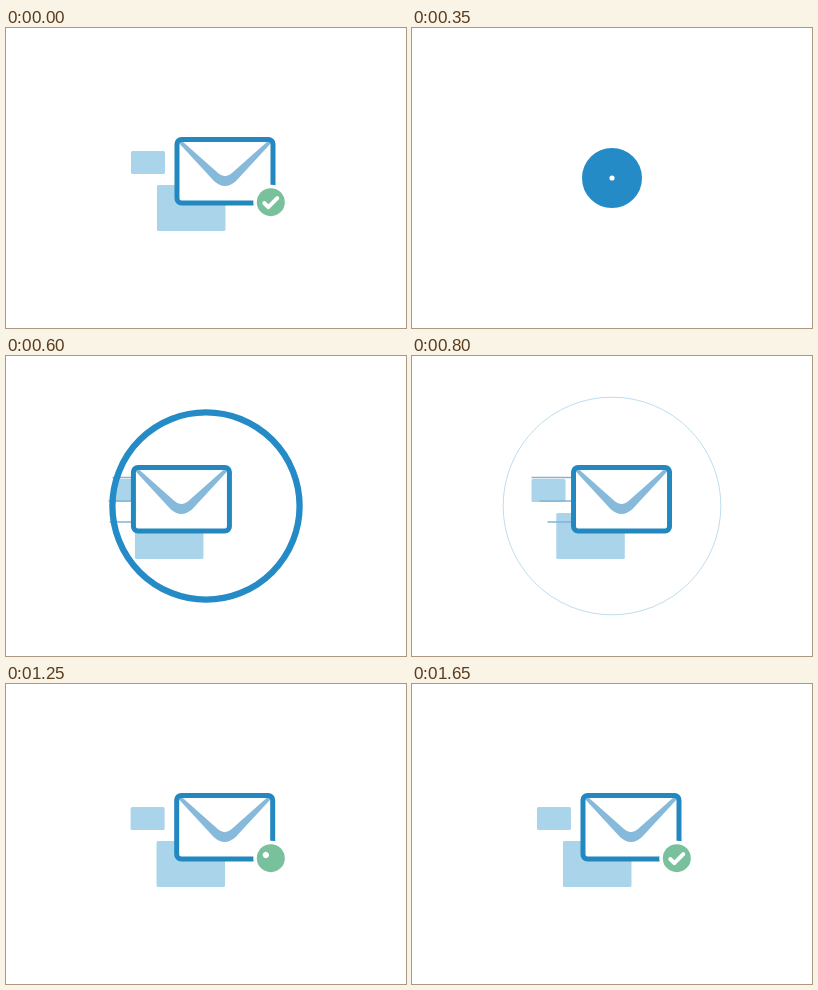
Write an HTML page that moves like this. It is 400 px wide and 300 px high and loops after 1700 ms.

```html
<!DOCTYPE html>
<html lang="en">
<head>
<meta charset="utf-8">
<title>Message sent</title>
<style>
  html, body { margin: 0; width: 100%; height: 100%; overflow: hidden; background: #fff; }
  svg { display: block; width: 100vw; height: 100vh; }
</style>
</head>
<body>
<svg viewBox="0 0 400 300">
  <clipPath id="port"><circle id="hole" cx="200" cy="150"/></clipPath>
  <g clip-path="url(#port)">
    <rect id="small" x="125" y="123" width="34" height="23" rx="1.5" fill="#a9d4ea"/>
    <rect id="big" x="151" y="157" width="68.5" height="46" rx="1.5" fill="#a9d4ea"/>
    <g id="mail">
      <g id="trails" stroke="#82b5d3" stroke-width="1.6">
        <line x1="169" x2="169" y1="121.5" y2="121.5"/>
        <line x1="169" x2="169" y1="145" y2="145"/>
        <line x1="169" x2="169" y1="166" y2="166"/>
      </g>
      <rect x="171" y="111.5" width="96" height="63.5" rx="4.5" fill="#fff"/>
      <path d="M171 113 L208 153 Q219 163 230 153 L267 113 H262 L226 145 Q219 151.5 212 145 L176 113 Z" fill="#86b9da"/>
      <rect x="171" y="111.5" width="96" height="63.5" rx="4.5" fill="none" stroke="#2388c0" stroke-width="5"/>
    </g>
    <g id="badge">
      <circle r="17.5" fill="#fff"/>
      <circle r="14" fill="#79c09c"/>
      <path id="check" d="M-6.5 .8 L-2.5 5 L6.5 -4" pathLength="100" fill="none" stroke="#fff"
        stroke-width="4" stroke-linecap="round" stroke-linejoin="round"/>
    </g>
  </g>
  <circle id="ring" cx="200" cy="150" fill="none" stroke="#258bc6"/>
</svg>
<script>
  const LOOP = 1700, STEP = 50;
  const $ = id => document.getElementById(id);
  const [hole, small, big, mail, badge, check, ring] =
    ['hole', 'small', 'big', 'mail', 'badge', 'check', 'ring'].map($);
  const trails = [...$('trails').children];

  const progress = (t, from, to) => Math.max(0, Math.min(1, (t - from) / (to - from)));
  const easeIn = (p, n) => p ** n;
  const easeOut = (p, n) => 1 - (1 - p) ** n;
  const decay = (t, tau) => Math.exp((500 - t) / tau);

  const set = (el, attrs) => {
    for (const name in attrs) el.setAttribute(name, attrs[name]);
  };
  const slide = (el, x) => set(el, { transform: `translate(${x} 0)` });
  const show = (el, on) => set(el, { visibility: on ? 'visible' : 'hidden' });

  function render(t) {
    if (t < STEP) t = LOOP - STEP;    // the loop opens on the finished pose

    // A dot swells, then opens into a thinning ring.
    const outer = 30 * easeIn(progress(t, 50, 350), 2.4) + 79 * easeOut(progress(t, 350, 800), 2.3);
    const inner = 108.7 * easeOut(progress(t, 345, 800), 2.17);
    set(ring, { r: (outer + inner) / 2, 'stroke-width': outer - inner });
    set(hole, { r: outer + 1 });
    show(ring, t <= 800);

    // The envelope glides in, the blocks follow at their own pace.
    const lag = -40 * decay(t, 168);
    slide(mail, -93.5 * decay(t, 131));
    slide(big, lag);
    slide(small, lag * .82);

    const k = progress(t, 1100, 800);
    trails.forEach((line, i) => {
      set(line, { x1: 169 - (40 - 8 * i) * k });
      show(line, k > 0);
    });

    const scale = easeOut(progress(t, 950, 1200), 2);
    set(badge, { transform: `translate(264.8 174.2) scale(${scale})` });
    show(badge, scale > 0);

    const drawn = progress(t, 1250, 1450), drop = (1 - drawn) ** 2;
    set(check, {
      transform: `translate(${1.5 * drop} ${-4 * drop})`,
      'stroke-width': 4 + 2 * drop,
      'stroke-dasharray': `${1 + 99 * drawn} 200`
    });
    show(check, t >= 1250);
  }

  const start = performance.now();
  function tick() {
    const t = (performance.now() - start) % LOOP;
    render(Math.floor(t / STEP) * STEP);
    requestAnimationFrame(tick);
  }
  tick();
</script>
</body>
</html>
```
